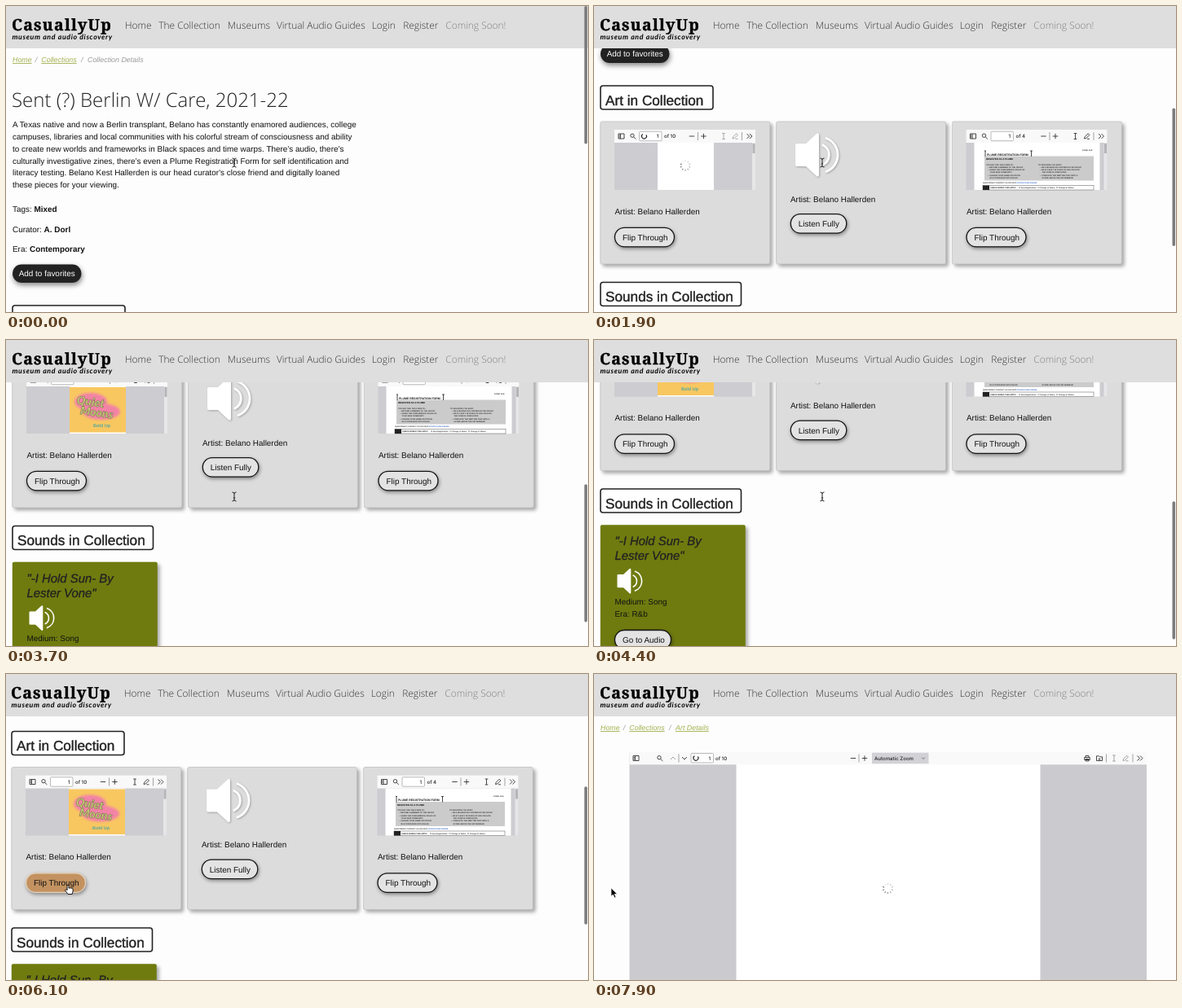
An HTML page for the animation above (8000 ms loop, 714 px wide and 376 px high).

```html
<!DOCTYPE html>
<html lang="en">
<head>
<meta charset="utf-8">
<title>Collection details</title>
<style>
  html, body { margin: 0; width: 100%; height: 100%; overflow: hidden; background: #fdfdfd; }
  svg { display: block; width: 714px; height: 376px; font-family: "Liberation Sans", Arial, sans-serif; font-size: 9.93px; text-rendering: geometricPrecision; }
  text { white-space: pre; fill: #111; }
  .nav { font: 300 11.9px "Open Sans", sans-serif; fill: #333; }
  .logo { font: 900 19.5px "Noto Serif", serif; letter-spacing: 1.2px; fill: #000; stroke: #000; stroke-width: .4; }
  .tagline { font: italic 700 8.8px Lato, sans-serif; letter-spacing: .63px; fill: #000; }
  .title { font: 300 24px "Open Sans", sans-serif; fill: #222; }
  .crumb { font-size: 8.9px; font-style: italic; fill: #999; }
  .link { fill: #a3b04f; text-decoration: underline; }
  .heading { font-size: 17.2px; fill: #222; stroke: #222; stroke-width: .4; }
  .song { font-size: 14.9px; font-style: italic; fill: #222; stroke: #222; stroke-width: .3; }
  .bold { font-weight: 700; }
  .white { fill: #fff; }
  .bar { font: 500 6.1px Inter, sans-serif; fill: #222; }
  .icon { fill: none; stroke: #333; stroke-width: .9; }
  .dim { stroke: #999; }
  .pill { fill: #e3e3e3; stroke: #151515; stroke-width: 1.3; filter: drop-shadow(1px 2px 2px #0006); }
  .card { filter: drop-shadow(3px 3px 2px #0005); }
  .tiny { font-size: 2.3px; font-weight: 700; fill: #333; }
</style>
</head>
<body>
<svg id="stage" viewBox="0 0 714 376"></svg>
<script>
const LOOP = 8000, STEP = 100;
const ARTIST = 'Belano Hallerden';

const text = (x, y, str, cls = '') => `<text x="${x}" y="${y}" class="${cls}">${str}</text>`;
const rect = (x, y, w, h, fill, attrs = '') =>
  `<rect x="${x}" y="${y}" width="${w}" height="${h}" fill="${fill}" ${attrs}/>`;
const group = (id, content) => `<g id="${id}">${content}</g>`;
const at = (x, y, content) => `<g transform="translate(${x} ${y})">${content}</g>`;

const ICONS = {
  sidebar: 'M-3.5 -3h7v6h-7zM-1 -3v6M-3 -1h1.5M-3 1h1.5',
  search: 'M1.2 -.8a2.2 2.2 0 1 0 -4.4 0a2.2 2.2 0 1 0 4.4 0M.7 .9L3.4 3.5',
  minus: 'M-3.2 0h6.4',
  plus: 'M-3.2 0h6.4M0 -3.2v6.4',
  sep: 'M0 -5v10',
  beam: 'M-1.8 -3.5h3.6M0 -3.5v7M-1.8 3.5h3.6',
  pen: 'M-3 3l.7 -2.3l4 -4l1.7 1.7l-4 4zM.5 3.3h3',
  more: 'M-3 -3l3 3l-3 3M.5 -3l3 3l-3 3',
  up: 'M-3 1.5l3 -3l3 3',
  down: 'M-3 -1.5l3 3l3 -3',
  print: 'M-2 -1v-2h4v2M-3.3 -1h6.6v3h-6.6zM-2 1h4v2.4h-4z',
  save: 'M-3.5 -2.7h3l1 1h3v4.7h-7zM0 -.5v2.5M-1.2 .8l1.2 1.2l1.2 -1.2'
};
const icon = (name, x, y, dim = false) =>
  `<path class="icon ${dim || name === 'sep' ? 'dim' : ''}" d="${ICONS[name]}" transform="translate(${x} ${y})"/>`;

const spokes = Array.from({ length: 10 }, (_, i) =>
  `<path d="M0 -4.6v-2" stroke="#444" stroke-width="1" opacity="${.15 + i * .08}" transform="rotate(${i * 36})"/>`).join('');
const spinner = (x, y) => at(x, y, `<g class="spin">${spokes}</g>`);
const ring = (x, y) => at(x, y,
  '<g class="spin"><circle r="3" fill="none" stroke="#222" stroke-width="1.1" stroke-dasharray="14 5"/></g>');

const pageBox = (x, y) => rect(x, y - 5.7, 27.5, 11.4, '#fff', 'stroke="#aaa" stroke-width=".8" rx="1"') +
  text(x + 21.5, y + 2.3, '1', 'bar');

function smallViewer(id, x, pages, body) {
  const y = 430;
  const tools = [['sidebar', 8.5], ['search', 23], ['minus', 95], ['sep', 102.5], ['plus', 109.5],
    ['sep', 156.5], ['more', 165.5]];
  return rect(x, 422, 173, 74, '#ccccd1') + body +
    rect(x + 169, 438, 4, 58, '#e6e6e8') + rect(x + 169.5, 439, 3, 12, '#b5b5b8') +
    rect(x, 422, 173, 16, '#f9f9fa') +
    tools.map(([name, dx]) => icon(name, x + dx, y)).join('') +
    group(id + 'Edit', icon('beam', x + 134, y) + icon('pen', x + 148, y)) +
    pageBox(x + 30.5, y) + text(x + 61, y + 2.3, `of ${pages}`, 'bar');
}

const pill = (x, y, w, label, id = '') =>
  `<rect ${id && `id="${id}"`} class="pill" x="${x}" y="${y}" width="${w}" height="23.5" rx="11.75"/>` +
  text(x + 9.5, y + 15.6, label);

const headingBox = (y, w, label) =>
  rect(8, y, w, 29, '#fff', 'stroke="#222" stroke-width="1.6" rx="3"') + text(14, y + 23.6, label, 'heading');

const card = x => rect(x, 412, 208, 175, '#dcdcdc', 'class="card" rx="2" stroke="#bcbcbc" stroke-width=".7"');

const speaker = (x, y, scale) => `<g transform="translate(${x} ${y}) scale(${scale})">
  <path d="M0 -12q0 -2 2 -2h11l13 -12q3 -2 3 2v48q0 4 -3 2l-13 -12h-11q-2 0 -2 -2z" fill="#fff"/>
  <g fill="none" stroke="#fff" stroke-width="2.8" stroke-linecap="round">
  <path d="M34 -12a13.5 13.5 0 0 1 0 24M38 -20.5a22 22 0 0 1 0 41"/></g></g>`;

const poster = rect(78, 439, 69, 55.5, '#f8c760') +
  `<g filter="url(#glow)"><ellipse cx="104" cy="457" rx="20" ry="11" fill="#f283a5"/>
   <ellipse cx="117" cy="469" rx="23" ry="10" fill="#f283a5"/></g>
   <g font-family="Lato, sans-serif" font-weight="900" font-style="italic" font-size="14"
      stroke="#7d7358" stroke-width=".6" transform="rotate(8 112 463)">
   <text x="86" y="463" style="fill:#c5cf72">Quiet</text><text x="92" y="475" style="fill:#c5cf72">Moons</text></g>
   <text x="107" y="488" font-size="5.5" font-weight="700" style="fill:#57a8a0">Bold Up</text>`;

const bullets = (x, y, lines) => lines.map((line, i) => text(x, y + i * 3.3, line, 'tiny')).join('');
const form = rect(466.5, 438, 154, 58, '#fff') +
  rect(479, 454.5, 134, 30, '#cbcbcb') +
  '<text x="482" y="453.5" font-size="3.5" font-weight="700">PLUME REGISTRATION FORM</text>' +
  '<path class="icon" d="M480 448v7M479 448h2M536.5 448v7M535 448h3"/>' +
  '<text x="481" y="459.2" font-size="2.9" font-weight="700">REGISTER AS A PLUME</text>' +
  text(599, 448, 'FORM 12-B', 'tiny') +
  bullets(481, 465.5, ['YOU MAY USE THIS FORM TO:', '   •  BECOME A MEMBER OF THE GROUP', '   •  LEARN THE FUNDAMENTAL RULES OF',
    '       YOUR NEW COMMUNITY', '   •  CHANGE YOUR NAME OR STATUS', '       IN ACCORDANCE WITH RULES']) +
  bullets(545, 465.5, ['TO REGISTER YOU MUST:', '   •  BE A READER OR LISTENER IN THE GROUP', '   •  BE AT LEAST 18 YEARS OF AGE ON DATE',
    '       THE FORM IS COMPLETED', '   •  COMPLETE THE WRITTEN TEST WITH A', '       SCORE ABOVE THE SET MINIMUM']) +
  `<text x="477" y="488.2" class="tiny">QUESTIONS? CONTACT US OR VISIT <tspan fill="#36c">OFFICE PAGE ONLINE</tspan></text>` +
  rect(477, 490.5, 136, 5.5, '#fff', 'stroke="#555" stroke-width=".5"') + rect(477, 490.5, 8, 5.5, '#222') +
  '<text x="486" y="494.4" font-size="2.4" font-weight="700">CHECK BOXES THIS APPLY</text>' +
  text(521, 494.4, '☐ New Registration   ☐ Change of Name   ☐ Change of Status', 'tiny');

const story = [
  'A Texas native and now a Berlin transplant, Belano has constantly enamored audiences, college',
  'campuses, libraries and local communities with his colorful stream of consciousness and ability',
  'to create new worlds and frameworks in Black spaces and time warps. There’s audio, there’s',
  'culturally investigative zines, there’s even a Plume Registration Form for self identification and',
  "literacy testing. Belano Kest Hallerden is our head curator's close friend and digitally loaned",
  'these pieces for your viewing.'
];
const fact = (y, label, value) => text(8, y, `${label}: <tspan class="bold">${value}</tspan>`);
const crumbs = last => text(8, 69, 'Home', 'crumb link') + text(35.8, 69, '/', 'crumb') +
  text(43.3, 69, 'Collections', 'crumb link') + text(92, 69, '/', 'crumb') + last;

const collection =
  crumbs(text(100, 69, 'Collection Details', 'crumb')) +
  text(7, 124, 'Sent (?) Berlin W/ Care, 2021-22', 'title') +
  story.map((line, i) => text(8, 149 + i * 14.85, line)).join('') +
  fact(253, 'Tags', 'Mixed') + fact(277.5, 'Curator', 'A. Dorl') + fact(302.3, 'Era', 'Contemporary') +
  rect(8, 317.5, 84.5, 22.5, '#222', 'rx="11.25" style="filter:drop-shadow(1px 3px 3px #0007)"') +
  text(15.7, 331.8, 'Add to favorites', 'white') +
  headingBox(368, 138, 'Art in Collection') +
  card(7.8) + card(223.6) + card(439.4) +
  smallViewer('book', 25, 10, rect(78, 438, 69, 58, '#fff') + group('poster', poster) + group('thumbWait', spinner(112, 466))) +
  group('ringWait', rect(56.5, 425.5, 10, 9, '#fff') + ring(61.5, 430)) +
  `<g style="filter:drop-shadow(1px 1px 1px #0004)">${speaker(247, 453, 1)}</g>` +
  smallViewer('form', 456.5, 4, form) +
  [[25.5, 525.5], [241, 510.5], [457, 525.5]].map(([x, y]) => text(x, y, `Artist: ${ARTIST}`)).join('') +
  pill(25.5, 542.3, 73, 'Flip Through', 'flip') + pill(241.3, 525.6, 68.5, 'Listen Fully') + pill(457, 542.3, 73, 'Flip Through') +
  headingBox(609.5, 172.5, 'Sounds in Collection') +
  rect(7.8, 653.7, 178, 172, '#6f7b0f', 'class="card" rx="2"') +
  text(25.5, 678.6, '"-I Hold Sun- By', 'song') + text(25.5, 696.6, 'Lester Vone"', 'song') +
  speaker(28.5, 722.7, .58) +
  text(25.5, 751.2, 'Medium: Song') + text(25.5, 766, 'Era: R&amp;b') + pill(25.5, 783, 69, 'Go to Audio');

const bigTools = [['sidebar', 51.5], ['search', 81], ['up', 97, true], ['sep', 104], ['down', 111], ['minus', 318],
  ['sep', 325], ['plus', 332], ['print', 605], ['save', 620], ['sep', 628.5], ['beam', 638, true], ['pen', 652, true],
  ['sep', 661], ['more', 669.5]];
const detail = rect(0, 0, 714, 376, '#fdfdfd') +
  crumbs(text(100, 69, 'Art Details', 'crumb link')) +
  rect(43.5, 96, 634.5, 280, '#cbcbcf') +
  group('sheet', rect(174.5, 111, 373, 265, '#fff') + spinner(360.5, 263.5)) +
  group('toolbar', rect(43.5, 96, 634.5, 15.3, '#f9f9fa') +
    bigTools.map(([name, x, dim]) => icon(name, x, 103.5, dim)).join('') +
    pageBox(119, 103.2) + text(149, 105.6, 'of 10', 'bar') +
    rect(341, 96.7, 69.5, 13.5, '#d2d2d6') + text(344, 105.6, 'Automatic Zoom', 'bar') +
    `<g transform="translate(404 103.5) scale(.65)">${icon('down', 0, 0)}</g>` +
    group('bigRing', ring(125, 103.2)));

const nav = [[146, 'Home'], [187.3, 'The Collection'], [271.7, 'Museums'], [332, 'Virtual Audio Guides'],
  [448.7, 'Login'], [487.2, 'Register']];
const header = rect(-2, 0, 720, 52, '#dedede') +
  text(7, 30, 'CasuallyUp', 'logo') + text(7.5, 41, 'museum and audio discovery', 'tagline') +
  nav.map(([x, label]) => text(x, 28.3, label, 'nav')).join('') +
  '<text x="539.3" y="28.3" class="nav" style="fill:#808080">Coming Soon!</text>';

const outline = 'stroke-linejoin="round" stroke-linecap="round"';
const pointers =
  group('beam', '<path d="M-2.5 -5.5q2.5 0 2.5 2v7q0 2 -2.5 2M2.5 -5.5q-2.5 0 -2.5 2M2.5 5.5q-2.5 0 -2.5 -2M-1.2 1.5h2.4" fill="none" stroke="#222" stroke-width="1"/>') +
  group('arrow', `<path d="M0 0v10.3l2.4 -2.2l1.7 3.9l1.8 -.8l-1.7 -3.8h3.2z" fill="#000" stroke="#fff" stroke-width=".7" ${outline}/>`) +
  group('hand', `<path d="M-2 1v-5.2q1 -1.6 2 0v3.4q1 -1 1.8 0q1 -.8 1.7 .2q1.4 -.6 1.6 .8v3l-1 3.3h-5l-3.7 -4.6q.3 -1.6 2.6 -.9z" fill="#fff" stroke="#000" stroke-width=".9" ${outline}/>`);

document.getElementById('stage').innerHTML =
  '<defs><filter id="glow" x="-20%" y="-20%" width="140%" height="140%"><feGaussianBlur stdDeviation="1.5"/></filter></defs>' +
  rect(0, 0, 714, 376, '#fdfdfd') + group('collection', collection) + group('detail', detail) + group('header', header) +
  rect(709.5, 0, 3.6, 169.5, '#7c7c7c', 'id="thumb" rx="1.8"') + group('pointer', pointers);

const el = id => document.getElementById(id);
const show = (id, visible) => { el(id).style.display = visible ? '' : 'none'; };
const move = (id, x, y) => el(id).setAttribute('transform', `translate(${x} ${y})`);
const clamp01 = v => Math.min(1, Math.max(0, v));
const ease = (t, from, to) => { const p = clamp01((t - from) / (to - from)); return p * p * (3 - 2 * p); };

const SCROLL = [[400, 0], [700, 18], [1000, 62], [1400, 146], [1900, 270], [2100, 294], [2400, 312], [2800, 312],
  [2900, 323], [3200, 345], [3300, 345], [3800, 390], [4400, 426.5], [4700, 435], [4900, 432], [5200, 393],
  [5500, 328], [5900, 297.5]];
function scrollAt(t) {
  const next = SCROLL.findIndex(([time]) => time > t);
  if (next < 1) return next ? SCROLL[SCROLL.length - 1][1] : 0;
  const [t0, s0] = SCROLL[next - 1], [t1, s1] = SCROLL[next];
  return s0 + (s1 - s0) * (t - t0) / (t1 - t0);
}

function draw(t) {
  const onDetail = t >= 6300, loading = t < 2600;
  const scroll = onDetail ? 0 : scrollAt(t);
  const shift = t >= 5400 && !onDetail ? -1 : 0;
  move('collection', shift, -scroll);
  move('header', shift, 0);
  show('collection', !onDetail);
  show('detail', onDetail);
  show('toolbar', t >= 6500);
  show('sheet', t >= 7100);
  show('bigRing', t >= 7100);
  show('poster', !loading);
  show('thumbWait', loading);
  show('ringWait', loading);
  el('bookEdit').style.opacity = loading ? .45 : 1;
  document.querySelectorAll('.spin').forEach(s => s.setAttribute('transform', `rotate(${t * .36})`));

  el('thumb').setAttribute('y', scroll * .465);
  el('thumb').style.opacity = 1 - clamp01((t - 7100) / 300);

  const hover = t >= 6000;
  el('flip').style.fill = hover ? '#c39260' : '';
  el('flip').style.stroke = hover ? '#e6d3bd' : '';

  const reach = ease(t, 5400, 6000), leave = ease(t, 7000, 7500);
  move('pointer', 280 - 203 * reach - 56 * leave, 192.5 + 71.5 * reach - leave);
  show('beam', reach === 0);
  show('hand', hover && !onDetail);
  show('arrow', onDetail || (reach > 0 && !hover));
}

let start;
function frame(now) {
  start ??= now;
  draw(Math.floor((now - start) % LOOP / STEP) * STEP);
  requestAnimationFrame(frame);
}
draw(0);
requestAnimationFrame(frame);
</script>
</body>
</html>
```
